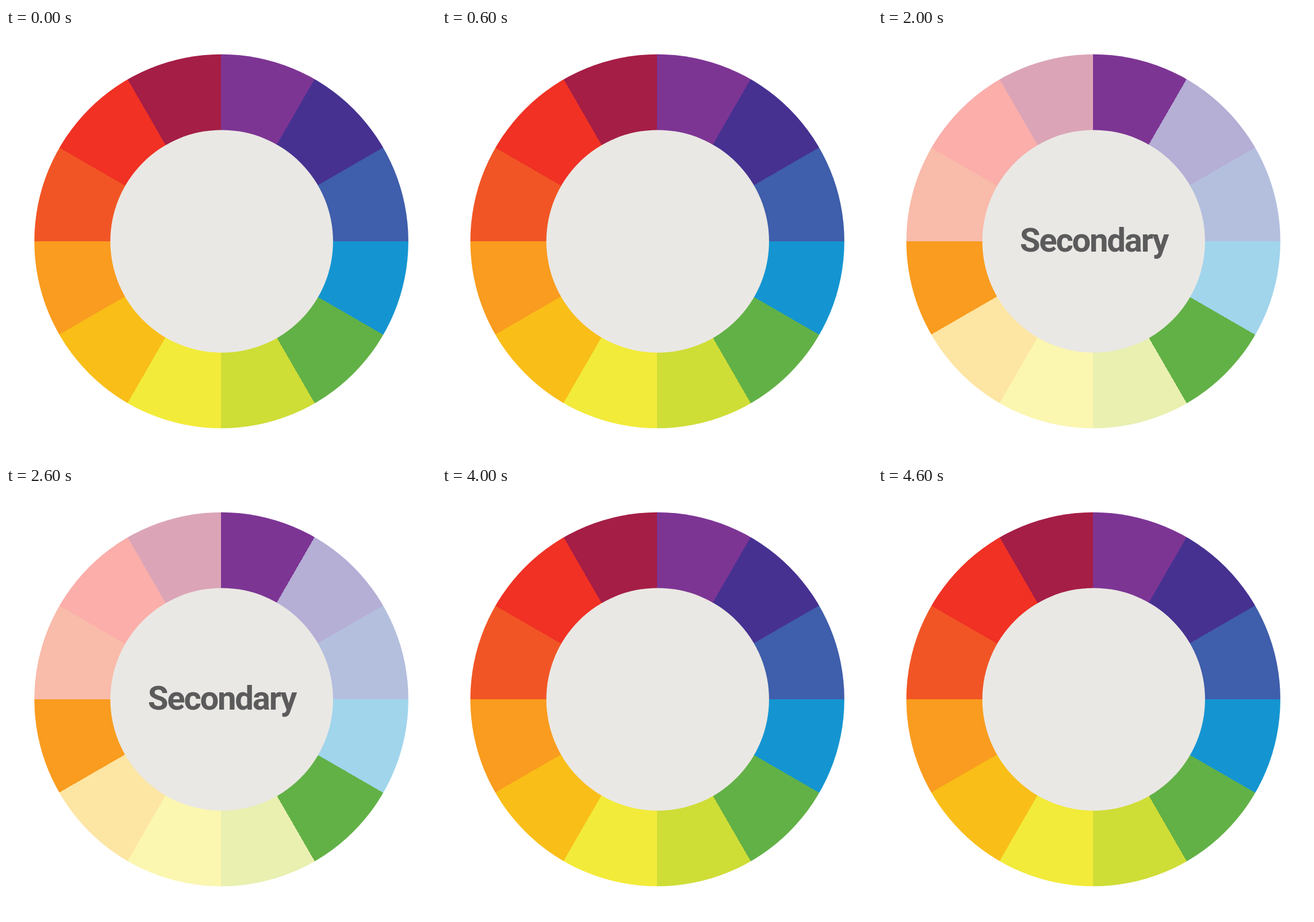
Write an HTML page with a canvas that moves like this. It is 748 px wide and 748 px high and loops after 5000 ms.

```html
<!DOCTYPE html>
<html lang="en">
<head>
<meta charset="utf-8">
<title>Colour wheel</title>
<style>
html, body { margin: 0; width: 100%; height: 100%; overflow: hidden; background: #fff; }
canvas { display: block; }
</style>
</head>
<body>
<canvas id="stage" width="748" height="748"></canvas>
<script>
const ctx = document.getElementById("stage").getContext("2d");

// Twelve hues, clockwise from the top
const vivid = ["#7d3594", "#463191", "#3f5eab", "#1495d1", "#62b146", "#cfdd37",
  "#f2eb3a", "#f9be18", "#f99c1f", "#f15525", "#f03124", "#a51e46"];
const pale = ["#cbb0d6", "#b5aed5", "#b4bfde", "#a1d5ec", "#c1e1b4", "#e9f0b0",
  "#fbf6b0", "#fde5a3", "#fed6a7", "#f9bbaa", "#fbaeaa", "#dba5b7"];

const all = { label: "", hub: "#eae8e4", lit: () => true };
const steps = [
  all,
  { label: "Primary", hub: "#eae8e4", lit: i => i % 4 === 2 },
  { label: "Secondary", hub: "#eae8e4", lit: i => i % 4 === 0 },
  { label: "Tertiary", hub: "#e9eae5", lit: i => i % 2 === 1 },
  all
];
const stepTime = 1000;

function disc(x, y, r, fill) {
  ctx.fillStyle = fill;
  ctx.beginPath();
  ctx.arc(x, y, r, 0, 2 * Math.PI);
  ctx.fill();
}

function wheelFill(lit) {
  const fill = ctx.createConicGradient(-Math.PI / 2, 374.1, 370.7);
  vivid.forEach((color, i) => {
    const shade = lit(i) ? color : pale[i];
    fill.addColorStop(i / 12, shade);
    fill.addColorStop((i + 1) / 12, shade);
  });
  return fill;
}

function draw({ label, hub, lit }) {
  ctx.clearRect(0, 0, 748, 748);
  disc(374.6, 371, 325.3, wheelFill(lit));
  disc(375.2, 371.1, 193.7, hub);
  ctx.font = "bold 58px Roboto, Inter, sans-serif";
  ctx.letterSpacing = "-2.2px";
  ctx.textAlign = "center";
  ctx.fillStyle = "#5b5b5c";
  ctx.fillText(label, 375.5, 389);
}

function tick() {
  draw(steps[Math.floor(performance.now() / stepTime) % steps.length]);
  requestAnimationFrame(tick);
}
tick();
</script>
</body>
</html>
```
